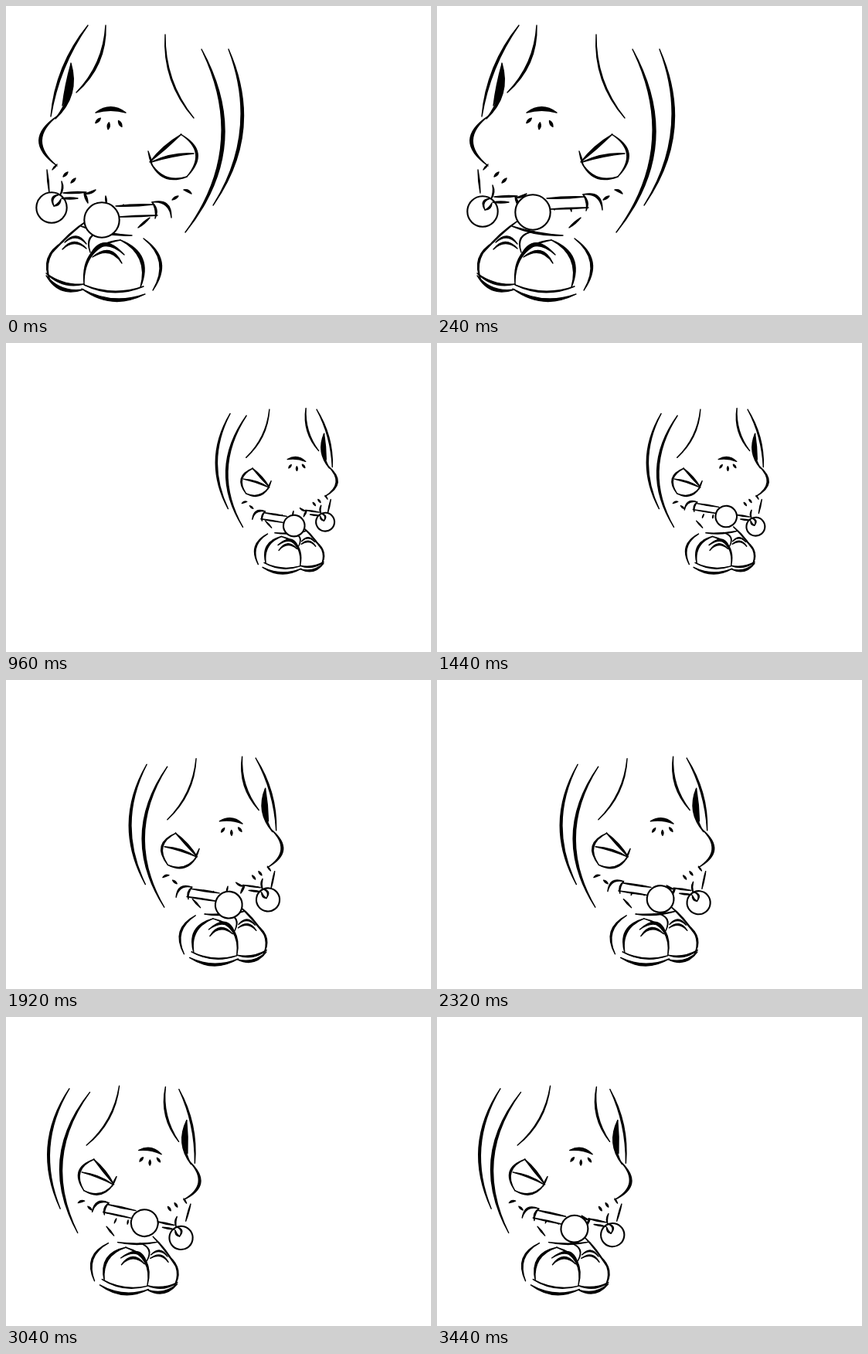
Recreate the animation shown at these times as an HTML page. Size 550x400 px, loop 3.52 s.

```html
<!DOCTYPE html>
<html lang="en">
<head>
<meta charset="utf-8">
<title>Dancer</title>
<style>
html, body { margin: 0; width: 100%; height: 100%; overflow: hidden; background: #fff; }
svg { display: block; width: 100%; height: 100%; }
path, circle { stroke: #000; stroke-width: 1.4; stroke-linejoin: round; vector-effect: non-scaling-stroke; }
circle { fill: #fff; stroke-width: 2.1; }
.sleeve { fill: #fff; stroke: none; }
</style>
</head>
<body>
<svg viewBox="0 0 550 400"><g id="girl"></g></svg>
<script>
const STEP = 80, FRAMES = 44;
const girl = document.getElementById('girl');

function add(parent, tag, attrs = {}) {
  const el = document.createElementNS('http://www.w3.org/2000/svg', tag);
  for (const k in attrs) el.setAttribute(k, attrs[k]);
  return parent.appendChild(el);
}

// Brush line from a to b: bowed sideways, thickest in the middle
const brushFor = parent => (x1, y1, x2, y2, bow = 0, width = 1.5) => {
  const dx = x2 - x1, dy = y2 - y1, len = Math.hypot(dx, dy);
  const via = h => `${(x1 + x2) / 2 - dy / len * h} ${(y1 + y2) / 2 + dx / len * h}`;
  add(parent, 'path', {
    d: `M${x1} ${y1}Q${via(2 * bow + width)} ${x2} ${y2}Q${via(2 * bow - width)} ${x1} ${y1}Z`
  });
};

function drawHair(brush) {
  brush(106, 25, 58, 143, 8.5, 2.5);
  brush(129, 25, 91, 112, -10, 2.5);
  brush(206, 37, 243, 145, 11, 1.5);
  brush(253, 56, 232, 293, -38, 4);
  brush(288, 56, 268, 258, -27, 3.5);
}

function drawFace(brush) {
  brush(84, 74, 64, 146, -9.5, 4);
  brush(84, 75, 73, 129, -2, 6);
  brush(67, 142, 66, 207, 22, 3.5);
  brush(66, 205, 60, 212);
  brush(116, 138, 155, 138, -5, 4.5);
  // lashes fan out under the brow
  for (let i = 0; i < 3; i++) {
    const a = (60 + 38 * i) * Math.PI / 180, c = Math.cos(a), s = Math.sin(a);
    brush(136 + 19 * c, 132 + 19 * s, 136 + 28 * c, 132 + 28 * s, 0, 3);
  }
  for (let i = 0; i < 2; i++) brush(74 + 10 * i, 221 + 8 * i, 80 + 10 * i, 215 + 8 * i, 0, 2.5);
  // mouth
  brush(186, 202, 227, 166, -1, 3.5);
  brush(226, 166, 234, 221, -17, 2.5);
  brush(234, 221, 187, 202, -11, 2);
  brush(188, 202, 243, 191, -2.5, 2.5);
  brush(184, 188, 189, 206);
}

function drawBody(brush) {
  brush(106, 277, 61, 318, 2);
  brush(97, 285, 163, 297, 3, 2);
  brush(186, 274, 171, 287, 0, 2);
  brush(129, 246, 130, 256);
  brush(152, 257, 152, 264);
  brush(172, 258, 174, 266);
  brush(215, 251, 223, 246, 0, 2.5);
  brush(230, 238, 240, 243, -1, 2.5);
}

function drawShoes(brush) {
  brush(74, 305, 57, 356, 11, 2);
  brush(52, 346, 101, 360, 6, 2.5);
  brush(52, 349, 100, 367, 9, 3.5);
  for (let i = 0; i < 2; i++) brush(76 - 3 * i, 306 + 9 * i, 104, 308 + 6 * i, -8, 2);
  brush(126, 292, 109, 319, 10, 1);
  brush(101, 360, 148, 303, -17, 2.5);
  brush(148, 303, 174, 364, -15, 3.5);
  brush(105, 331, 153, 322, -18, 4);
  brush(112, 325, 150, 333, -11, 3);
  brush(101, 361, 178, 363, 8, 1.5);
  brush(98, 366, 180, 373, 11, 3.5);
  brush(178, 301, 190, 368, -16, 2.5);
}

function drawFarArm(g) {
  const brush = brushFor(g);
  add(g, 'circle', { cx: 59, cy: 261, r: 19.7 });
  brush(72, 227, 70, 245, -2);
  brush(70, 244, 62, 259, 6, 2);
  brush(62, 259, 71, 250, 2, 2);
  brush(74, 242, 104, 241, 0, 2);
  brush(72, 249, 93, 249, 0, 2);
  brush(101, 241, 106, 255, 0, 2.5);
  brush(103, 243, 116, 238, 1, 2);
}

function drawNearArm(g) {
  const brush = brushFor(g);
  add(g, 'path', { class: 'sleeve', d: 'M130 259L190 257L194 272L130 273Z' });
  brush(142, 259, 190, 257, 0, 2);
  brush(146, 273, 196, 271);
  brush(189, 254, 214, 274, -9, 2.5);
  brush(189, 254, 193, 275, -3, 2);
  add(g, 'circle', { cx: 124, cy: 277, r: 22.7 });
}

[drawHair, drawFace, drawBody, drawShoes].forEach(draw => draw(brushFor(girl)));
brushFor(girl)(53, 212, 56, 242);
const farArm = add(girl, 'g'), nearArm = add(girl, 'g');
drawFarArm(farArm);
drawNearArm(nearArm);

// Facing right is a tilted mirror image
const left = (size, x, y) => `translate(${x} ${y}) scale(${size})`;
const right = (size, tilt, x, y) => `translate(${x} ${y}) rotate(${tilt}) scale(${-size} ${size})`;
const poses = [
  { start: 0, place: left(1, 0, 0) },
  { start: 7, place: left(0.552, 137, 13.5) },
  { start: 12, place: right(0.607, 6.9, 467.7, 78.7) },
  { start: 24, place: right(0.765, 6.3, 405.8, 90.9) },
  { start: 30, place: left(0.766, 268.2, 26.5), shift: 2 },
  { start: 36, place: right(0.768, 10, 307.3, 88.8) }
];

function draw() {
  const frame = Math.floor(performance.now() / STEP) % FRAMES;
  const pose = poses.filter(p => p.start <= frame).pop();
  // the hands swing against each other, four steps a beat
  const swing = (1 - Math.cos((frame + (pose.shift || 0)) * Math.PI / 2)) / 2;
  girl.setAttribute('transform', pose.place);
  farArm.setAttribute('transform', `translate(0 ${10 * swing})`);
  nearArm.setAttribute('transform', `translate(0 ${-20 * swing})`);
  requestAnimationFrame(draw);
}
draw();
</script>
</body>
</html>
```
